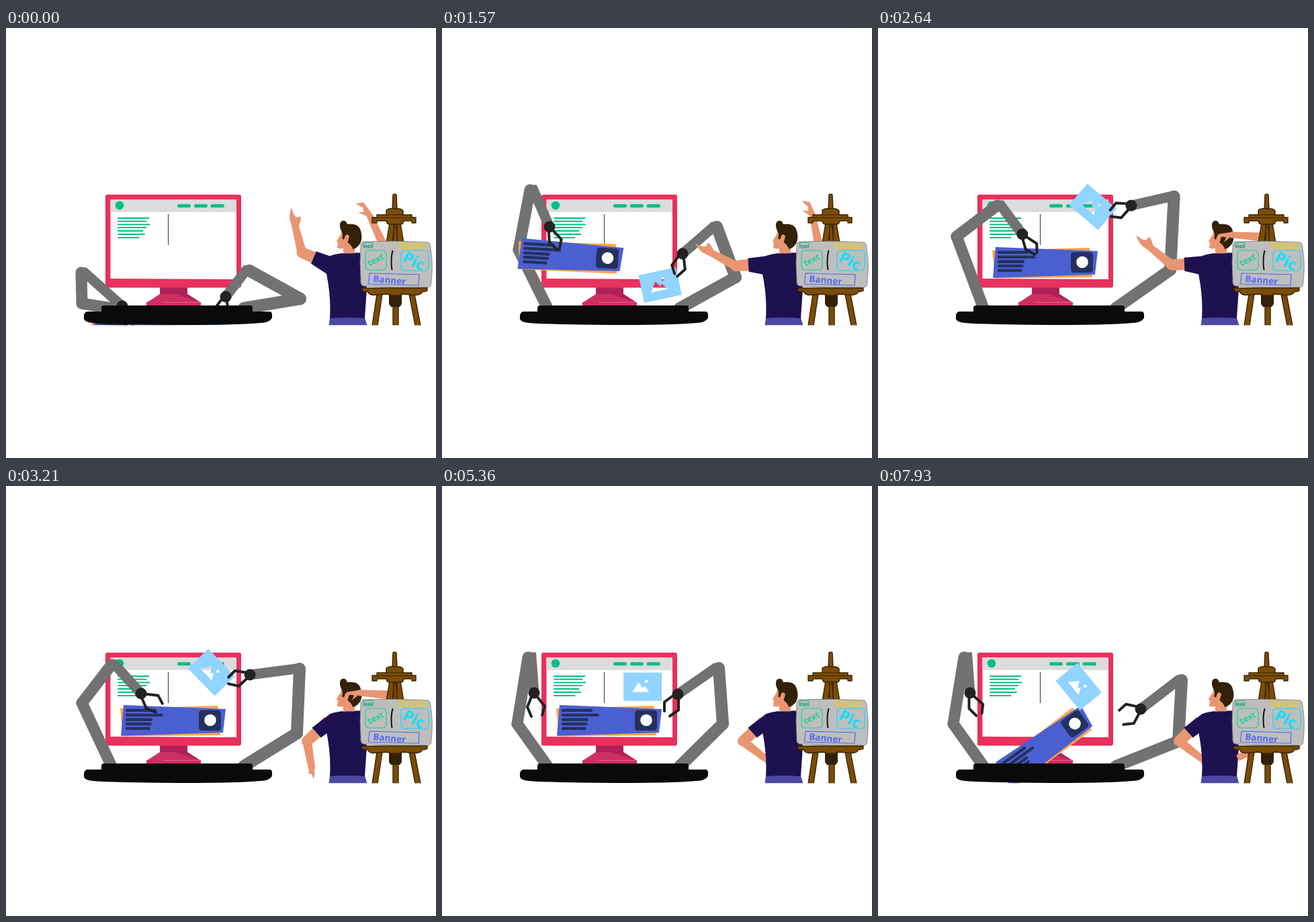
Recreate the animation shown at these times as an HTML page. Size 640 px wide and 640 px high, loop 8 s.

```html
<!DOCTYPE html>
<html lang="en">
<head>
<meta charset="utf-8">
<title>Building a web page</title>
<style>
  html, body { margin: 0; width: 100%; height: 100%; overflow: hidden; background: #fff; }
  svg { display: block; width: 100vw; height: 100vh; }
  text { font-family: "Open Sans", "Noto Sans", sans-serif; font-weight: 700; }
  .arm path { fill: none; stroke: #727272; stroke-linecap: round; }
  .claw path { fill: none; stroke: #222; stroke-width: 4; stroke-linecap: round; stroke-linejoin: round; }
  .claw circle { fill: #222; }
  .skin { fill: #e89672; }
  .shirt { fill: #1e1150; }
  .hair { fill: #332107; }
  .wood { fill: #7b4c05; stroke: #3a2403; stroke-width: 1.4; stroke-linejoin: round; }
  .sketch { fill: none; stroke-width: 1.2; }
</style>
</head>
<body>
<svg viewBox="0 0 640 640">
  <clipPath id="floor"><rect width="640" height="442.3"/></clipPath>
  <g clip-path="url(#floor)">
    <g id="monitor">
      <path fill="#b0215a" d="M229 385H270V398H229Z"/>
      <path fill="#cc3062" d="M229 396H270L290 409H209Z"/>
      <path fill="#b0215a" d="M252 396H270L290 409Z"/>
      <path fill="#d42c60" d="M209 408H290V415H209Z"/>
      <path stroke="#ea5c86" d="M233 408.5H289"/>
      <rect x="148" y="248" width="202" height="138.5" rx="3" fill="#e8315d"/>
      <path fill="#fff" d="M155.5 255.5H343V374L155.5 373Z"/>
      <path fill="#dcdcdc" d="M155.5 255.5H343V274H155.5Z"/>
      <circle cx="169" cy="264" r="6.3" fill="#06be84"/>
      <path stroke="#06be84" stroke-width="5" stroke-linecap="round" d="M257.5 264.7H272.5M282.5 264.7H297.5M307 264.7H322.5"/>
      <path stroke="#06be84" stroke-width="2" stroke-linecap="round"
        d="M167 283H212.5M167 287.7H208.5M167 292.4H213.5M167 297H208.5M167 302H203.5M167 307H206M167 312H197.5"/>
      <path stroke="#333" d="M241.5 277V323"/>
    </g>

    <g id="armL" class="arm"><path stroke-width="17"/><path stroke-width="17"/><path stroke-width="15"/></g>
    <g id="armR" class="arm"><path stroke-width="18"/><path stroke-width="18"/><path stroke-width="15"/></g>

    <g id="banner">
      <path fill="#fba64b" d="M-79-18.5L66-22.5L70 21.5L-75 23Z"/>
      <path fill="#4b60d0" d="M-74-23.5L78-17.5L74 17.5L-78 22.5Z"/>
      <path stroke="#26305f" stroke-width="4.4" stroke-linecap="round"
        d="M-69-15.6H-27M-69-8.6H-17M-69-1.8H-33M-69 4.6H-34.5M-69 11.4H-36.5"/>
      <rect x="38" y="-16" width="33" height="30.5" rx="4.5" fill="#26305f"/>
      <circle cx="55" cy="-1" r="8.8" fill="#fff"/>
    </g>
    <path id="picture" fill="#90d4ff" fill-rule="evenodd"
      d="M-28.5-21H28.5V21H-28.5ZM-15.5 8L-6-6.5L0 2L3-1.5L9.5 8ZM3.2-8a2.3 2.3 0 1 0 4.6 0a2.3 2.3 0 1 0-4.6 0Z"/>

    <g id="clawL" class="claw"><path d="M-4 6L-10 21L-4 35"/><path d="M5 6L16 20L12 33"/><circle r="8.5"/></g>
    <g id="clawR" class="claw"><path d="M-7 2L-20 11.5L-20 25"/><path d="M1 7L1 23.5L-12 32.5"/><circle r="8.5"/></g>

    <path fill="#0a0a0a" d="M146 413H364Q367 413 367 417V422H392Q396 422 396 427V431Q395 435 387 438Q360 442 260 442Q150 441 130 439Q117 438 116 433Q115 422 122 422H142V417Q142 413 146 413Z"/>

    <g id="man">
      <g class="skin">
        <path id="upperL"/><path id="foreL"/><circle id="elbowL" r="8"/>
        <path id="handL" d="M-4-5L10-6L18-4L26 0L15 1.5L10 4L10 11L5 10L-4 5Z"/>
      </g>
      <path fill="#4c49a2" d="M482 431H534L537.5 443H480.5Z"/>
      <path id="sleeve" class="shirt"/>
      <path class="shirt" d="M481 340Q492 334 527 334.5L537 388L534 432Q508 430 482 432Q484 400 477 366Z"/>
      <g id="head">
        <path class="skin" d="M501 300L497.5 308L492 317L494 320L493 327.5Q497 329 502 328V335.5H519V320L514 302Z"/>
        <path class="hair" d="M500 304Q495 294 498 289Q501 285 506 288L508 292Q523 290 527 299Q532 312 527 321Q522 328 516 329Q515 324 508.5 319L511 310Q508 305 505 309L503 315L500 313Q502 308 500 304Z"/>
      </g>
      <g class="skin">
        <path id="foreR"/>
        <path id="handR" d="M-4-4.5L1-4L13-12L8.5-4L15-2L26-8L20.5 3L1 4.5L-4 4.5Z"/>
      </g>
    </g>

    <g id="easel">
      <path class="wood" d="M552 396H560L553 443H545ZM600 396H608L617 443H609ZM576 410H584V443H576Z"/>
      <path fill="#332107" d="M570 396H589V411L586 415H573L570 411Z"/>
      <path class="wood" d="M571 290H578L575 320H566ZM580 290H587L592 320H583ZM577 290H582V320H577Z"/>
      <path class="wood" d="M576 248Q578.5 246.5 581 248L582 270H575Z"/>
      <path class="wood" d="M566 271Q570 268 578 269Q588 268 591 272V278H604V282H610V290H604V287H592Q591 292 588 292H570Q567 292 566 287H552V290H545V282H552V278H566Z"/>
      <path fill="none" stroke="#3a2403" stroke-width="1.2" d="M552 282.5H604M566 278H591"/>
      <path fill="#bebebe" stroke="#777" stroke-width=".8" d="M532 318Q580 316 628 319Q632 320 632 328Q636 350 633 378Q633 386 628 386Q580 387 532 384Q527 383 528 374Q526 350 528 325Q528 318 532 318Z"/>
      <g class="sketch">
        <rect x="532" y="319.5" width="14" height="7.5" rx="2" stroke="#18bd8e"/>
        <rect x="535" y="331" width="31" height="29" rx="5" stroke="#18d39b"/>
        <rect x="588" y="331" width="41" height="30" rx="5" stroke="#0fdcf5"/>
        <path stroke="#e9c928" d="M585 320H624L625 328H586Z"/>
        <path stroke="#5268ec" d="M541 365L615 367L614 383L539.5 381Z"/>
        <path stroke="#111" stroke-width="2" d="M575.5 331Q572 345 574.5 360"/>
      </g>
      <g text-anchor="middle">
        <text x="539" y="325.5" font-size="6" fill="#14997a">logo</text>
        <text transform="translate(552 349) rotate(-27)" font-size="12.5" fill="#18d39b">text</text>
        <text transform="translate(604 354) rotate(27)" font-size="23" fill="#0fe0fa">Pic</text>
        <text x="605" y="327" font-size="8.5" fill="#e9c928">menubar</text>
        <text transform="translate(570.5 380) rotate(5)" font-size="13.5" fill="#5268ec">Banner</text>
      </g>
      <path class="wood" d="M530 387H627V391Q624 393 620 392Q618 397 611 397.5L590 396L585 398H573L568 396L546 397.5Q540 397 538 392Q531 393 530 391Z"/>
    </g>
  </g>
</svg>
<script>
const LOOP = 8000, STEP = LOOP / 112;
const RAD = Math.PI / 180;
const $ = id => document.getElementById(id);
const clamp = u => Math.min(1, Math.max(0, u));
const progress = (t, start, end) => clamp((t - start) / (end - start));
const smooth = u => u * u * (3 - 2 * u);
const transform = (id, s) => $(id).setAttribute('transform', s);
const setPath = (el, d) => el.setAttribute('d', d);
const polar = ([x, y], deg, r) => [x + r * Math.cos(deg * RAD), y + r * Math.sin(deg * RAD)];

// Eases from one pose to the next; every move is [start, end, pose].
function glide(t, first, ...moves) {
  return moves.reduce((pose, [start, end, next]) => {
    const k = smooth(progress(t, start, end));
    return pose.map((v, i) => v + (next[i] - v) * k);
  }, first);
}

// Robot poses: joints from elbow to claw, then turn and spread of the fingers.
const left = {
  base: [157, 417], side: 1,
  fold: [[113, 410], [112, 364], [173, 414], -15, 10],
  lift: [[114, 330], [131, 241], [160, 296], -15, 10],
  place: [[117, 310], [178, 264], [215, 307], -28, 10],
  leave: [[113, 323], [157, 266], [201, 309], -45, 0],
  rest: [[112, 354], [128, 255], [137, 308], 0, 0]
};
const right = {
  base: [354, 417], side: -1,
  fold: [[438, 403], [362, 361], [327, 400], -12, 5],
  lift: [[437, 371], [409, 296], [358, 336], -12, 5],
  carry: [[436, 360], [435, 264], [376, 300], 2, 5],
  swing: [[435, 360], [441, 250], [377, 262], 43, 1],
  hold: [[433, 368], [437, 272], [363, 281], 46, 1],
  place: [[424, 360], [415, 262], [341, 260], 0, 3],
  wait: [[418, 354], [412, 271], [351, 310], 0, 0],
  rest: [[447, 380], [452, 289], [391, 332], 0, 0]
};
for (const robot of [left, right])
  for (const name in robot)
    if (!['base', 'side'].includes(name)) robot[name] = robot[name].flat();
const grip = (pose, turn, spread) => [...pose.slice(0, 6), turn, spread];

const leftPose = t => glide(t, left.fold,
  [500, 1570, left.lift], [1590, 2490, left.place], [2600, 3200, left.leave],
  [3500, 4200, left.rest], [5400, 5950, grip(left.rest, 0, 5)], [7714, 7930, grip(left.rest, -16, 6)]);

const rightPose = t => glide(t, right.fold,
  [500, 1570, right.lift], [1590, 2140, right.carry], [2200, 2720, right.swing],
  [2720, 3210, right.hold], [3450, 4100, right.place], [4150, 4700, right.wait],
  [5650, 6710, right.rest], [7300, 7930, grip(right.rest, 38, -10)]);

function drawRobot(name, { base, side }, [bx, by, cx, cy, dx, dy, turn, spread]) {
  const [lower, upper, fore] = $('arm' + name).children;
  setPath(lower, `M${base}L${bx} ${by}`);
  setPath(upper, `M${bx} ${by}L${cx} ${cy}`);
  setPath(fore, `M${cx} ${cy}l${5 * side} 0L${dx} ${dy}`);
  transform('claw' + name, `translate(${dx} ${dy})`);
  const [f1, f2] = $('claw' + name).children;
  f1.setAttribute('transform', `rotate(${turn - spread})`);
  f2.setAttribute('transform', `rotate(${turn + spread})`);
}

// Each piece hangs rigidly from its claw until it is let go, and drops at the end.
function drawPieces(t) {
  const [, , , , lx, ly, lTurn] = leftPose(Math.min(t, 2490));
  const fall = progress(t, 7250, 7930), tilt = (lTurn + 28) / 4;
  transform('banner', `translate(${lx} ${ly + 37.5 * fall ** 4}) rotate(${tilt})
    translate(34 42.5) rotate(${-36 * fall ** 2})`);

  const [, , , , rx, ry, rTurn] = rightPose(Math.min(t, 4100));
  transform('picture', `translate(${rx} ${ry}) rotate(${rTurn})
    translate(-42.3 38.7) rotate(${51 * progress(t, 7714, 7930)})`);
}

// Limb that narrows from width w1 to w2.
function limb([x1, y1], [x2, y2], w1, w2) {
  const len = Math.hypot(x2 - x1, y2 - y1);
  const nx = (y1 - y2) / len / 2, ny = (x2 - x1) / len / 2;
  return `M${x1 + nx * w1} ${y1 + ny * w1}L${x2 + nx * w2} ${y2 + ny * w2}` +
    `L${x2 - nx * w2} ${y2 - ny * w2}L${x1 - nx * w1} ${y1 - ny * w1}Z`;
}

function drawMan(t) {
  // Angle of the upper arm, angle of the forearm, hand size.
  const point = [176, 208, 1], aim = [178, 219, 1], hang = [138, 80, .55], hip = [138, 38, .5];
  const [upper, fore, size] = glide(t, [203, 256, 1],
    [70, 860, point], [1600, 2100, aim], [2640, 3200, hang], [3480, 4000, hip]);
  const shoulder = [480, 351];
  const cuff = polar(shoulder, upper, 24);
  const elbow = polar(shoulder, upper, 43), wrist = polar(elbow, fore, 43);
  setPath($('sleeve'), `M500 335L482 339.5L${polar(cuff, upper + 90, 10)}L${polar(cuff, upper - 90, 10)}L479 367L500 360Z`);
  setPath($('upperL'), limb(shoulder, elbow, 19, 16));
  setPath($('foreL'), limb(elbow, wrist, 14, 10));
  transform('elbowL', `translate(${elbow})`);
  transform('handL', `translate(${wrist}) rotate(${fore + 2}) scale(${size})`);

  // Elbow, forearm angle and length, hand size.
  const wave = [561, 324, 258, 46, 1], brow = [570, 311, 184, 45, .85];
  const hidden = [556, 370, 153, 20, 0], waist = [553, 396, 153, 20, 0];
  const [ex, ey, angle, length, scale] = glide(t, [562, 324, 245, 50, 1],
    [900, 1570, wave], [1600, 2080, brow], [4450, 5000, hidden], [5400, 5950, waist]);
  const rightWrist = polar([ex, ey], angle, length);
  setPath($('foreR'), limb([ex, ey], rightWrist, 13, 9));
  transform('handR', `translate(${rightWrist}) rotate(${angle - 8}) scale(${scale})`);

  const nod = glide(t, [0], [6150, 6600, [-5]], [6950, 7400, [0]]);
  transform('head', `rotate(${nod} 510 332)`);
}

function draw(now) {
  const t = Math.floor((now % LOOP + 5) / STEP) * STEP % LOOP;
  drawRobot('L', left, leftPose(t));
  drawRobot('R', right, rightPose(t));
  drawPieces(t);
  drawMan(t);
}

const start = performance.now();
function tick() {
  draw(performance.now() - start);
  requestAnimationFrame(tick);
}
tick();
</script>
</body>
</html>
```
